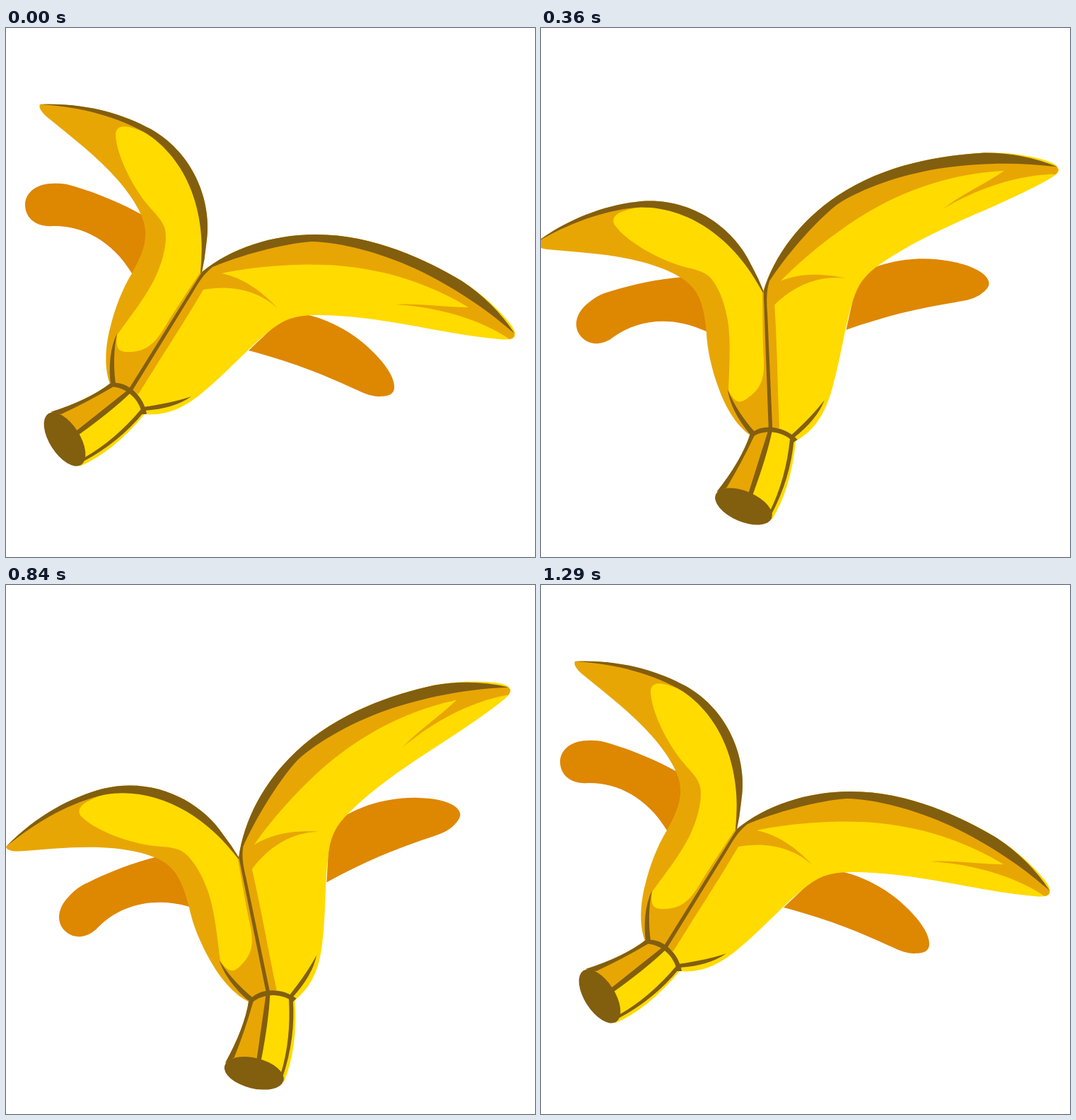
Write an HTML page with a canvas that moves like this. It is 748x748 px and loops after 1.32 s.

```html
<!DOCTYPE html>
<html lang="en">
<head>
<meta charset="utf-8">
<title>Rocking banana peel</title>
<style>
  html, body { margin: 0; width: 100%; height: 100%; overflow: hidden; background: #fff; }
  canvas { display: block; width: 748px; height: 748px; }
</style>
</head>
<body>
<canvas id="stage" width="748" height="748"></canvas>
<script>
const ctx = document.getElementById('stage').getContext('2d');

const YELLOW = '#ffdb00', AMBER = '#e8a604', BROWN = '#825e0f', ORANGE = '#de8700';
const LOOP = 1320, STEP = 30, RISE = 630, FALL = 660, SWING = 54.3;
const PIVOT = { x: 262, y: 456 };

// Painted back to front, in the resting pose
const layers = [
  // far peel strips
  [ORANGE, 'M196 266C162 247 130 234 97 224C86 220 76 219 64 220C40 221 27 235 27 250C27 268 42 282 66 280C107 279 150 300 178 347L215 330Z'],
  [ORANGE, 'M400 402C440 403 488 426 520 459C537 476 549 494 549 507C549 518 542 521 526 521C512 520 504 515 492 510C445 488 400 471 343 456Z'],

  // left strip
  [AMBER, 'M48 108C110 105 165 121 205 143C268 179 293 250 283 307Q281 327 277 345L178 514L147 503C139 482 140 452 147 425C154 396 164 370 178 347C193 320 198 304 197 287C196 268 182 243 159 216C130 182 91 153 57 125Q45 114 48 108Z'],
  [YELLOW, 'M155 151C155 140 164 136 181 142Q194 146 203 152C266 192 284 262 277 310L275 345C258 371 240 397 222 427C207 451 194 458 172 458C158 458 155 452 157 434C175 409 202 375 214 346C224 323 229 296 224 282C219 269 211 263 201 251C177 222 156 178 155 151Z'],
  [BROWN, 'M48 108C110 105 165 121 205 143C268 179 293 250 283 307Q281 327 277 345L275 347C284 270 262 192 200 150C160 126 105 111 48 108Z'],

  // right strip
  [YELLOW, 'M277 345C318 312 375 292 438 292C520 292 595 328 645 358C672 375 697 398 712 417Q722 429 719 437Q715 442 697 440C610 432 530 406 440 406C411 406 397 411 381 422C350 444 317 483 282 512C252 538 226 549 194 546L174 513Z'],
  [AMBER, 'M277 345C318 312 375 292 438 292C520 292 595 328 645 358Q690 388 719 431Q720 439 712 440C666 409 605 394 551 391C585 389 620 395 654 395C610 368 550 344 480 337C422 331 352 337 305 347C339 354 365 376 384 396C355 370 317 363 279 370C249 421 217 469 187 518L174 513Z'],
  [BROWN, 'M277 345C318 312 375 292 438 292C520 292 595 328 645 358Q690 388 719 432C680 398 635 367 578 340C530 318 475 303 432 302C390 305 330 322 292 338C279 348 271 362 264 374L178.5 513L174 510Z'],

  // folds above the collar
  [BROWN, 'M157 432C147 452 145 480 148 504L155 503C152 480 152 455 157 432Z'],
  [BROWN, 'M262 521Q236 530 194 536L196 541Q238 538 262 521Z'],

  // stem
  [YELLOW, 'M148 502Q117 526 64 543L105 619.5Q152 599 196 546L176 514Z'],
  [AMBER, 'M148 502Q117 526 64 543L102 573L174 514Z'],
  [BROWN, 'M148 502Q117 526 63 543L78 546Q115 529 152 507Z'],
  [BROWN, 'M172 512L99 570L103 575Q149 542 176 516Z'],
  [BROWN, 'M191 539Q154 583 110 608L109 613Q160 586 195 543Z'],
  [BROWN, 'M146 503C168 496 195 519 199 546L192 546C190 527 171 507 147 507Z']
].map(([color, d]) => [color, new Path2D(d)]);

const cutEnd = new Path2D();
cutEnd.ellipse(83, 581.5, 43, 21.5, 57.4 * Math.PI / 180, 0, 2 * Math.PI);
layers.push([BROWN, cutEnd]);

const bezier = (s, a, b) => 3 * (1 - s) ** 2 * s * a + 3 * (1 - s) * s * s * b + s ** 3;

// Ease in and out, solving the curve's x by bisection
function ease(u) {
  let low = 0, high = 1;
  for (let i = 0; i < 24; i++) {
    const mid = (low + high) / 2;
    if (bezier(mid, 0.45, 0.55) < u) low = mid; else high = mid;
  }
  return bezier(low, 0, 1);
}

function swingAt(t) {
  if (t <= 0 || t >= RISE + FALL) return 0;
  return SWING * (t < RISE ? ease(t / RISE) : ease((RISE + FALL - t) / FALL));
}

function draw(t) {
  const a = swingAt(t);
  const dx = 2.82 * a + 0.0054 * a * a;
  const dy = 0.52 * a - 0.0013 * a * a;
  ctx.setTransform(1, 0, 0, 1, 0, 0);
  ctx.fillStyle = '#fff';
  ctx.fillRect(0, 0, 748, 748);
  ctx.translate(PIVOT.x + dx, PIVOT.y + dy);
  ctx.rotate(-a * Math.PI / 180);
  ctx.translate(-PIVOT.x, -PIVOT.y);
  for (const [color, path] of layers) {
    ctx.fillStyle = color;
    ctx.fill(path);
  }
}

const start = performance.now();
function tick() {
  const t = (performance.now() - start) % LOOP;
  draw(Math.floor(t / STEP) * STEP);
  requestAnimationFrame(tick);
}
tick();
</script>
</body>
</html>
```
